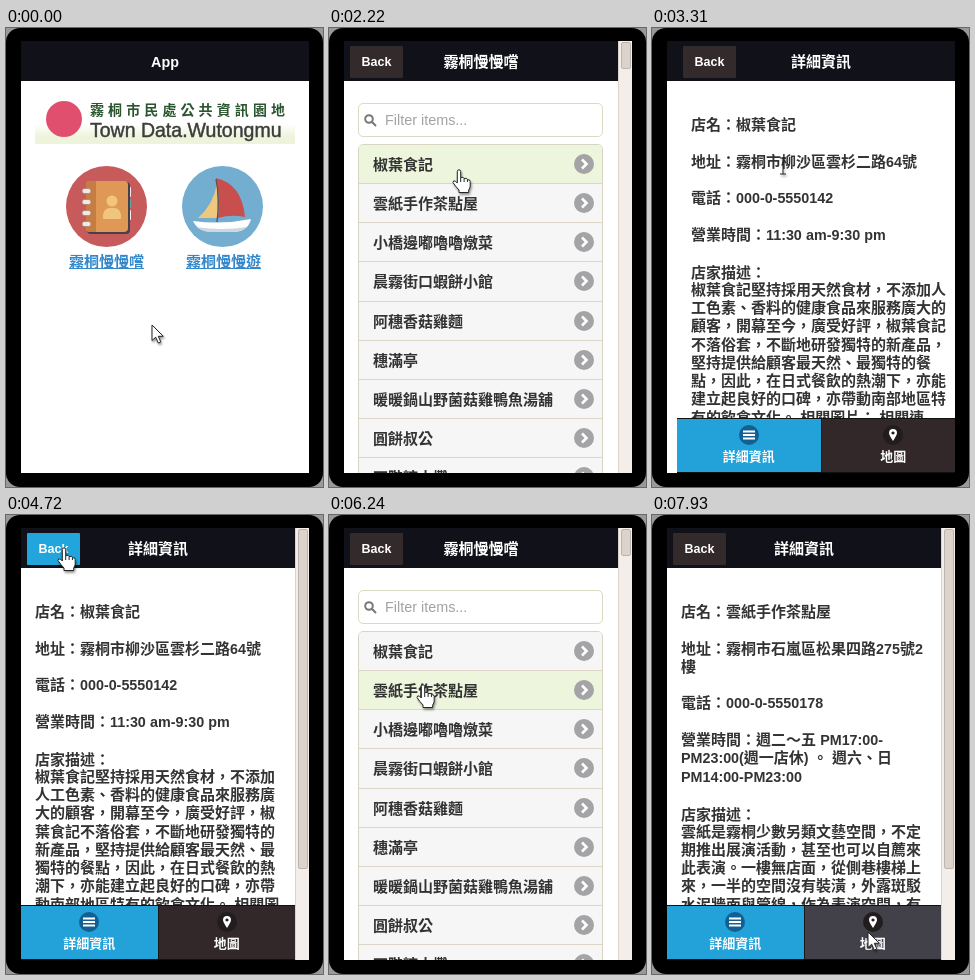
An HTML page for the animation above (7990 ms loop, 317x459 px).

```html
<!DOCTYPE html>
<html lang="zh-Hant">
<head>
<meta charset="utf-8">
<title>App</title>
<style>
html, body { margin: 0; width: 100%; height: 100%; overflow: hidden; background: #999; }
* { box-sizing: border-box; }
#device { position: absolute; left: 0; top: 0; width: 317px; height: 459px; overflow: hidden; border-radius: 14px; background: #000;
  font: bold 15px "Liberation Sans", "Noto Sans CJK TC", "Noto Sans CJK", sans-serif; color: #333;
  text-spacing-trim: space-all; text-autospace: no-autospace; }
#screen { position: absolute; left: 15px; top: 13px; width: 288px; height: 432px; overflow: hidden; isolation: isolate;
  background: linear-gradient(#11111a 40px, #fff 0); }
.page { position: absolute; left: 0; top: 0; width: 288px; height: 432px; overflow: hidden; background: #fff; }
.page.narrow { width: 274px; }
header { height: 40px; background: #11111a; color: #fff; text-align: center; line-height: 41px; position: relative; }
.back { position: absolute; left: 6px; top: 5px; width: 53px; height: 32px; border-radius: 1px; background: #332a2c; font-size: 12.5px; line-height: 32px; }
.back.active, .row.active { background: #22a5dc; color: #fff; }
.latin { font-size: .955em; }

.art { position: absolute; left: 0; top: 0; }
.city, .site { position: absolute; left: 69px; white-space: nowrap; }
.city { top: 59px; font-size: 14px; line-height: 20px; letter-spacing: 4.1px; color: #2b552f; }
.site { top: 77px; font-size: 19.5px; font-weight: normal; line-height: 24px; color: #3c3c3c; -webkit-text-stroke: .45px #3c3c3c; }
.link { position: absolute; top: 212px; height: 16px; overflow: hidden; line-height: 18px; color: #3388cc; border-bottom: 1px solid; }
.link.dark { color: #0059a0; }

.filter { position: absolute; left: 14px; right: 14px; top: 62px; height: 34px; border: 1px solid #d9dcc4; border-radius: 5px;
  padding-left: 26px; font-size: 14.4px; font-weight: normal; line-height: 32px; color: #a2a2a2; }
.filter svg { position: absolute; left: 4px; top: 9px; }
.narrow .filter, .narrow .rows { right: 15px; }
.rows { position: absolute; left: 14px; right: 14px; top: 103px; border: 1px solid #d9d5c4; border-radius: 5px 5px 0 0; overflow: hidden; }
.row { position: relative; height: 39.13px; padding-left: 14px; border-bottom: 1px solid #ddd5c8; line-height: 39px; background: #f6f6f6; white-space: nowrap; }
.row.hover { background: #edf5dc; }
.row svg { position: absolute; right: 8px; top: 9px; }

.info { position: absolute; left: 14px; right: 14px; top: 75px; line-height: 18.3px; white-space: pre-line; }
.narrow .info { right: 15px; }
.heading { position: relative; top: 2px; }
footer { position: absolute; left: 0; right: 0; bottom: 0; height: 55px; display: flex; border: solid #111; border-width: 1px 0; background: #111; }
.tab { flex: 1; background: #332829; color: #fff; font-size: 13px; text-align: center; line-height: 18px; padding-top: 6px; }
.tab svg { display: block; margin: 0 auto 3px; }
.tab:first-child { background: #22a2d9; }
.tab + .tab { border-left: 1px solid #1b1719; }
.tab.hover { background: #42414a; }

#bar { position: absolute; left: 274px; top: 0; width: 14px; height: 432px; background: #f3eee9; border-left: 1px solid #ddd3c8; }
#thumb { position: absolute; left: 2px; top: 1px; width: 10px; border: 1px solid #bfb4ad; border-radius: 2px; background: #dcd3cd; }
#cursor { position: absolute; left: 0; top: 0; width: 1px; height: 1px; overflow: visible; filter: drop-shadow(1.5px 2px 1px #0006); }
</style>
</head>
<body>
<div id="device">
  <div id="screen"></div>
  <svg id="cursor" fill="#fff" stroke="#222" stroke-linejoin="round">
    <path id="arrow" d="M0 0V15.5L3.7 12.2L6.3 18L8.8 16.9L6.3 11.3H11.3Z"/>
    <g id="hand">
      <path d="M-1.7 13V1.5a1.7 1.7 0 0 1 3.4 0V7.5q3-1 3.4 1q3-.9 3.3 1.1q2.8-.3 2.8 2V16q0 2-1.5 4v2.5H0V20Q-3 17-6 12.5q.2-2.6 2.5-1.3z"/>
      <path d="M1.7 7.5V12M5.1 8.5V12M8.4 9.6V12" fill="none"/>
    </g>
    <path id="beam" fill="none" d="M-3-8H3M0-8V8M-3 8H3"/>
  </svg>
</div>
<script>
const LOOP = 7990, WIDTH = 288, STEP = 60;
const $ = id => document.getElementById(id);
const wrapLatin = text => text.replace(/[!-~]+/g, '<span class="latin">$&</span>');

const shops = ['椒葉食記', '雲紙手作茶點屋', '小橋邊嘟嚕嚕燉菜', '晨霧街口蝦餅小館', '阿穗香菇雞麵',
  '穗滿亭', '暖暖鍋山野菌菇雞鴨魚湯舖', '圓餅叔公', '石階糖水攤'];

const page = (id, title, body, back = true) => `<section class="page" id="${id}">
  <header>${back ? '<span class="back">Back</span>' : ''}${title}</header>${body}</section>`;

const disc = (fill, mark) => `<svg width="20" height="20"><circle cx="10" cy="10" r="10" fill="${fill}"/>${mark}</svg>`;
const chevron = disc('#a4a3a5', '<path d="M8 5.5L12.5 10L8 14.5" fill="none" stroke="#fff" stroke-width="2.6"/>');
const bars = disc('#125f94', '<path d="M4 6.5h12M4 10h12M4 13.5h12" stroke="#fff" stroke-width="2"/>');
const pin = disc('#211c1e', '<path fill="#fff" fill-rule="evenodd" d="M10 16Q6 10 6 8a4 4 0 0 1 8 0Q14 10 10 16M10 6.4a1.6 1.6 0 1 0 .01 0"/>');

const rings = [150, 161, 172, 183].map(y =>
  `<rect x="61" y="${y - 2.5}" width="9" height="5" rx="2.5" fill="#eee9e2" stroke="#a9786a" stroke-width=".7"/>`).join('');

const homeBody = `<svg class="art" width="288" height="432">
  <defs><linearGradient id="pale" x2="0" y2="1"><stop offset=".6" stop-color="#fff"/><stop offset=".85" stop-color="#eef4dc"/></linearGradient></defs>
  <rect x="14" y="53" width="260" height="50" fill="url(#pale)"/>
  <circle cx="43" cy="78" r="18" fill="#e0506e"/>
  <circle cx="85.5" cy="165.5" r="40.5" fill="#c75a5a"/>
  <rect x="104" y="146" width="6" height="10" rx="1" fill="#f2eee6"/>
  <rect x="104" y="158" width="6" height="9" rx="1" fill="#5fa9a6"/>
  <rect x="104" y="169" width="6" height="10" rx="1" fill="#f2eee6"/>
  <rect x="66" y="141" width="43" height="52" rx="4" fill="#46404a"/>
  <rect x="65" y="140" width="42" height="51" rx="4" fill="#df9855"/>
  <path d="M69 140h6v51h-6q-4 0-4-4V144q0-4 4-4" fill="#c67d43"/>${rings}
  <circle cx="91" cy="160" r="5.5" fill="#f0c67f"/><path d="M82 178v-4q1-6 6-7h6q5 1 6 7v4z" fill="#f0c67f"/>
  <circle cx="201.5" cy="165.5" r="40.5" fill="#73add0"/>
  <path d="M196 143Q192 164 177 177H197z" fill="#efc87d"/>
  <path d="M195 137Q221 143 224 176Q210 173 197 177Q200 158 195 137" fill="#c84f4d"/>
  <path d="M195 138Q199 158 196 181" fill="none" stroke="#6d4a45" stroke-width="1.3"/>
  <path d="M172 180Q201 184 230 178Q227 191 211 191H190Q176 190 172 180" fill="#fff"/>
  <path d="M175 186Q183 191 190 191H211Q221 191 226 186Q201 190 175 186" fill="#cfd6dc"/></svg>
  <div class="city">霧桐市民處公共資訊園地</div><div class="site">Town Data.Wutongmu</div>
  <span class="link" id="eat" style="left:48px">霧桐慢慢嚐</span>
  <span class="link" id="play" style="left:165px">霧桐慢慢遊</span>`;

const listBody = `<div class="filter"><svg width="14" height="14" fill="none" stroke="#777" stroke-width="2">
  <circle cx="6" cy="6" r="3.8"/><path d="M8.8 8.8L13 13"/></svg>Filter items...</div>
  <div class="rows">${shops.map(name => `<div class="row">${name}${chevron}</div>`).join('')}</div>`;

const detailBody = (name, address, phone, hours, story) => `<div class="info">${wrapLatin(
`店名：${name}

地址：${address}

電話：${phone}

營業時間：${hours}

`)}<span class="heading">店家描述：</span>
${story}</div><footer><div class="tab">${bars}詳細資訊</div><div class="tab">${pin}地圖</div></footer>`;

$('screen').innerHTML =
  page('home', '<span class="latin">App</span>', homeBody, false) +
  page('list', '霧桐慢慢嚐', listBody) +
  page('first', '詳細資訊', detailBody(shops[0], '霧桐市柳沙區雲杉二路64號', '000-0-5550142', '11:30 am-9:30 pm',
    '椒葉食記堅持採用天然食材，不添加人工色素、香料的健康食品來服務廣大的顧客，開幕至今，廣受好評，椒葉食記不落俗套，不斷地研發獨特的新產品，堅持提供給顧客最天然、最獨特的餐點，因此，在日式餐飲的熱潮下，亦能建立起良好的口碑，亦帶動南部地區特有的飲食文化。 相關圖片： 相關連結：')) +
  page('second', '詳細資訊', detailBody(shops[1], '霧桐市石嵐區松果四路275號2樓', '000-0-5550178',
    '週二～五 PM17:00-PM23:00(週一店休) 。 週六、日 PM14:00-PM23:00',
    '雲紙是霧桐少數另類文藝空間，不定期推出展演活動，甚至也可以自薦來此表演。一樓無店面，從側巷樓梯上來，一半的空間沒有裝潢，外露斑駁水泥牆面與管線，作為表演空間，有各種展覽。')) +
  '<div id="bar"><div id="thumb"></div></div>';

const path = [[0, 146, 297], [540, 128, 197], [2040, 128, 197], [2220, 130, 142], [2400, 131, 139], [3910, 131, 138],
  [4390, 58, 33], [5160, 58, 33], [5220, 59, 45], [5420, 61, 52], [5720, 88, 140], [5840, 95, 170],
  [6680, 93, 170], [7000, 93, 170], [7540, 216, 417]];
const shapes = [[0, 'arrow'], [300, 'hand'], [3190, 'beam'], [4030, 'arrow'], [4330, 'hand'], [5400, 'arrow'], [5660, 'hand'], [6680, 'arrow']];
const slides = [
  { from: 'home', to: 'list', dir: 1, keys: [[1010, 0], [1250, .4725], [1520, .4725], [1640, 1]], settled: 1770 },
  { from: 'list', to: 'first', dir: 1, keys: [[3010, 0], [3310, .815], [3439, .815], [3440, 1]], settled: 3440 },
  { from: 'first', to: 'list', dir: -1, keys: [[4920, 0], [5220, .9], [5280, 1]], settled: 5280 },
  { from: 'list', to: 'second', dir: 1, keys: [[6440, 0], [6740, .86], [6860, 1]], settled: 6860 }];

function track(keys, t) {
  const i = keys.findLastIndex(key => key[0] <= t);
  if (i < 0) return keys[0].slice(1);
  const a = keys[i], b = keys[i + 1];
  if (!b) return a.slice(1);
  const p = Math.floor((t - a[0]) / STEP) * STEP / (b[0] - a[0]);
  return a.slice(1).map((v, k) => v + (b[k + 1] - v) * p);
}

const pages = [...document.querySelectorAll('.page')];
const rows = [...document.querySelectorAll('.row')];
const firstBack = document.querySelector('#first .back');
const firstFooter = document.querySelector('#first footer');
const mapTab = document.querySelector('#second .tab:last-child');

function render(t) {
  const [x, y] = track(path, t);
  const slide = slides.findLast(s => t >= s.keys[0][0] + STEP);
  const u = slide ? track(slide.keys, t)[0] : 0;
  const settled = !!slide && t >= slide.settled;
  const current = slide ? slide.to : 'home';
  const offsets = slide
    ? { [slide.from]: -slide.dir * WIDTH * (1 - (1 - u) ** 1.4), [slide.to]: slide.dir * WIDTH * (1 - u) ** 2 }
    : { home: 0 };

  for (const el of pages) {
    const shift = offsets[el.id];
    el.style.display = shift === undefined ? 'none' : 'block';
    el.style.transform = `translateX(${Math.round(shift || 0)}px)`;
    el.style.zIndex = el.id === current ? 1 : 0;
    // A leaving page keeps the width it had beside the scrollbar.
    el.classList.toggle('narrow', el.id !== 'home' && (settled || el.id !== current));
  }

  $('bar').style.display = settled ? 'block' : 'none';
  $('bar').style.zIndex = 2;
  $('thumb').style.height = current === 'list' ? '27px' : '340px';

  const listReady = settled && current === 'list';
  const hovered = listReady && y >= 116 ? Math.floor((y - 116) / 39.13) : -1;
  const tapped = t >= 2670 && t < 3440;
  rows.forEach((row, i) => {
    row.classList.toggle('hover', i === hovered);
    row.classList.toggle('active', tapped && i === 0);
  });
  $('eat').classList.toggle('dark', t >= 300);
  $('play').classList.toggle('dark', t >= 1070);
  firstBack.classList.toggle('active', t >= 4720);
  firstFooter.style.visibility = t >= 4980 ? 'hidden' : 'visible';
  mapTab.classList.toggle('hover', t >= 7870);

  const shape = shapes.findLast(s => s[0] <= t)[1];
  for (const id of ['arrow', 'hand', 'beam']) $(id).style.display = id === shape ? 'inline' : 'none';
  $('cursor').style.transform = `translate(${Math.round(x)}px, ${Math.round(y)}px)`;
}

const start = performance.now();
function tick() {
  render((performance.now() - start) % LOOP);
  requestAnimationFrame(tick);
}
tick();
</script>
</body>
</html>
```
